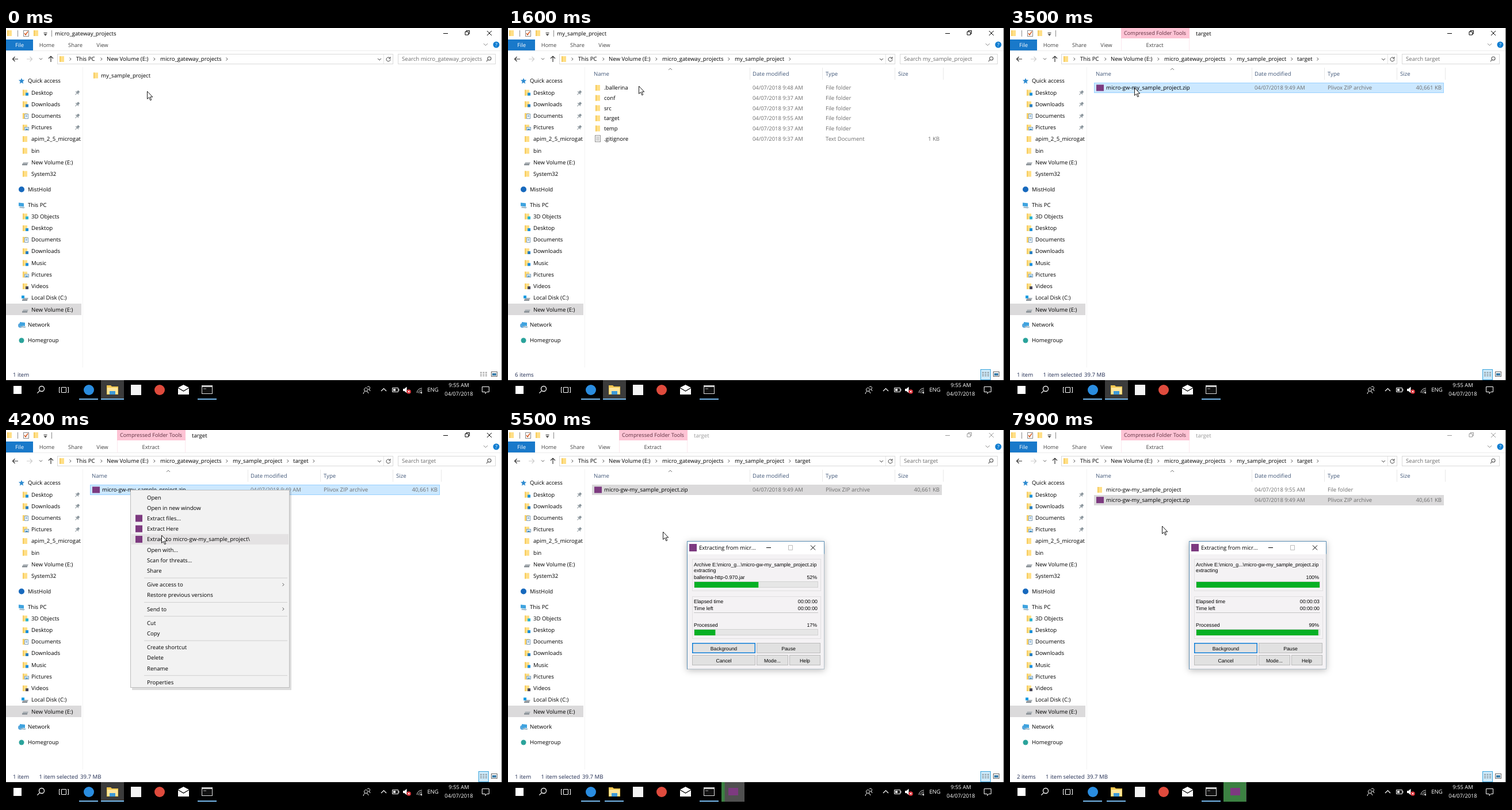
An HTML page that plays this animation: 862x650 px, repeating every 8 s.

```html
<!DOCTYPE html>
<html lang="en">
<head>
<meta charset="utf-8">
<title>Extracting a project archive</title>
<style>
html, body { margin: 0; width: 100%; height: 100%; overflow: hidden; background: #fff; }
svg { display: block; width: 100vw; height: 100vh; }
text { font-family: "Open Sans", "Noto Sans", sans-serif; text-rendering: geometricPrecision; white-space: pre; }
.dialog text { font-family: "Liberation Sans", Arial, sans-serif; }
.dialog text.title { font-family: "Open Sans", "Noto Sans", sans-serif; }
</style>
</head>
<body>
<svg id="stage" viewBox="0 0 862 650"></svg>
<script>
const LOOP = 8000, GREY = '#6d6d6d', NAVY = '#1e2a50', DIM = '#dbdadb', ARCHIVE = '#7d3a80', GREEN = '#06b025';
const stage = document.getElementById('stage');

// Drawing helpers; text is placed by its vertical centre, on a whole-pixel baseline.
const text = (x, y, s, fill = '#000', size = 9.6, anchor = 'start', cls = '') =>
  `<text class="${cls}" x="${x}" y="${Math.round(y + size * .355)}" font-size="${size}" fill="${fill}" text-anchor="${anchor}">${s}</text>`;
const rect = (x, y, w, h, fill, stroke = 'none', sw = 1) =>
  `<rect x="${x}" y="${y}" width="${w}" height="${h}" fill="${fill}" stroke="${stroke}" stroke-width="${sw}"/>`;
const frame = (x, y, w, h, fill, stroke) => rect(x + .5, y + .5, w - 1, h - 1, fill, stroke);
const line = (d, stroke = '#444', sw = 1) => `<path d="${d}" fill="none" stroke="${stroke}" stroke-width="${sw}"/>`;
const shape = (d, fill) => `<path d="${d}" fill="${fill}"/>`;
const disc = (x, y, r, fill) => `<circle cx="${x}" cy="${y}" r="${r}" fill="${fill}"/>`;
const lens = (x, y, r, c, sw) =>
  `<circle cx="${x}" cy="${y}" r="${r}" fill="none" stroke="${c}" stroke-width="${sw}"/>` +
  line(`M${x - r * .7} ${y + r * .7}l${-r} ${r}`, c, sw);
const chevron = (x, y) => line(`M${x - 1.5} ${y - 2.5}l2.5 2.5l-2.5 2.5`, '#555');
const folder = (x, y) => rect(x, y - 5, 8, 10, '#ffdf87') + rect(x, y - 5, 2, 10, '#f6cb5d');
const drive = (x, y) => shape(`M${x + 2} ${y}h9l-2 4h-9z`, '#aab0b5') + rect(x, y + 3, 9, 2, '#7e868c');

function along(t, keys) {
  const i = keys.findLastIndex(k => k[0] <= t), a = keys[i], b = keys[i + 1] || a;
  const f = b === a ? 0 : (t - a[0]) / (b[0] - a[0]);
  return [a[1] + (b[1] - a[1]) * f, a[2] + (b[2] - a[2]) * f];
}

const POINTER = [
  [0, 245, 110], [500, 233, 88], [900, 229, 90], [1500, 229, 90], [1600, 227, 101], [1700, 208, 150],
  [1800, 190, 193], [1900, 174, 160], [3400, 174, 160], [3500, 216, 104], [3700, 216, 104],
  [3800, 222, 110], [4100, 222, 110], [4200, 270, 183], [4400, 270, 183], [4500, 269, 177],
  [7700, 269, 177], [7800, 266, 171], [7900, 264, 167]];

// time, file %, total %, file name, seconds elapsed, seconds left
const PROGRESS = [
  [4800, 0, 0, '', 0, 0], [5000, 38, 4, 'ballerina-builtin-0.970.jar', 0, 0],
  [5300, 52, 14, 'ballerina-core-0.970.jar', 0, 0], [5500, 52, 17, 'ballerina-http-0.970.jar', 0, 0],
  [5600, 52, 20, 'ballerina-grpc-0.970.jar', 0, 0], [6100, 71, 36, 'commons-pool-1.5.6.jar', 1, 2],
  [6400, 34, 45, 'javax.websocket-api-1.1.jar', 1, 2], [6600, 60, 52, 'jackson-core-2.8.6.jar', 1, 2],
  [6700, 45, 56, 'netty-buffer-4.1.7.jar', 1, 2], [6800, 82, 60, 'netty-codec-4.1.7.jar', 1, 2],
  [7000, 30, 67, 'org.wso2.transport.http.jar', 2, 1], [7100, 48, 71, 'siddhi-core-4.0.7.jar', 2, 1],
  [7600, 76, 88, 'swagger-core-1.5.16.jar', 2, 1], [7800, 92, 98, 'swagger-parser-1.0.31.jar', 2, 1],
  [7900, 100, 99, '', 3, 0]];

const entry = (name, time, type = 'File folder', size = '') => ({ name, date: '04/07/2018 ' + time + ' AM', type, size });
const SAMPLE = [
  entry('.ballerina', '9:48'), entry('conf', '9:37'), entry('src', '9:37'), entry('target', '9:55'),
  entry('temp', '9:37'), entry('.gitignore', '9:37', 'Text Document', '1 KB')];
const ZIP = entry('micro-gw-my_sample_project.zip', '9:49', 'Plivox ZIP archive', '40,661 KB');
const UNPACKED = entry('micro-gw-my_sample_project', '9:55');

const MENU = ['Open', 'Open in new window', 'Extract files...', 'Extract Here',
  'Extract to micro-gw-my_sample_project\\', 'Open with...', 'Scan for threats...', 'Share', '-',
  'Give access to', 'Restore previous versions', '-', 'Send to', '-', 'Cut', 'Copy', '-',
  'Create shortcut', 'Delete', 'Rename', '-', 'Properties'];

const overlay = c => y => folder(29, y) + rect(34, y, 5, 5, c);
const sheet = y => folder(29, y) + frame(32, y - 4, 7, 9, '#fff', '#7d9cb5') + line(`M34 ${y - 1}h3m-3 2h3`, '#4a8ec2');
const picture = y => folder(29, y) + frame(32, y - 1, 8, 6, '#dceefa', '#7d9cb5') + rect(34, y + 2, 4, 2, '#4b97c9');
const plainFolder = y => folder(29, y);
const volume = y => drive(28, y);
const screen = (x, y) => shape(`M${x} ${y - 4}l9 1v6l-9-1z`, '#3fa3df') + shape(`M${x + 2} ${y + 3}l9 1l-2 2l-8-1z`, '#9db6c6');
const star = y => shape(`M27 ${y - 5}l1.5 3.3 3.6.3-2.8 2.4.9 3.7-3.2-1.9-3.2 1.9.9-3.7-2.8-2.4 3.6-.3z`, '#2e8bd0');
const SIDEBAR = [
  [92, 'Quick access', star, 1], [112.5, 'Desktop', overlay('#1f91d8')], [132.5, 'Downloads', overlay('#2b7fc0')],
  [153, 'Documents', sheet], [173, 'Pictures', picture], [193, 'apim_2_5_microgat', plainFolder],
  [213.5, 'bin', plainFolder], [233.5, 'New Volume (E:)', volume], [253.5, 'System32', plainFolder],
  [280.5, 'MistHold', y => disc(27, y, 5, '#1769bd'), 1], [307.5, 'This PC', y => screen(22, y), 1],
  [327.5, '3D Objects', overlay('#27b1d3')], [348, 'Desktop', overlay('#1f91d8')], [368, 'Documents', sheet],
  [388, 'Downloads', overlay('#2b7fc0')], [408.5, 'Music', overlay('#1c8fe0')], [428.5, 'Pictures', picture],
  [449, 'Videos', overlay('#4a4a5c')], [469, 'Local Disk (C:)', y => drive(28, y) + rect(27, y - 4, 5, 5, '#1b9de2')],
  [489.5, 'New Volume (E:)', volume],
  [516, 'Network', y => disc(25, y + 1, 4, '#58a7dd') + screen(24, y - 1), 1],
  [543, 'Homegroup', y => disc(27, y, 4.5, '#2aa39b'), 1]];

function sidebar() {
  const pin = y => `<g transform="translate(124 ${y}) rotate(45)">` + rect(-2, -4, 4, 4, '#8a959c') +
    rect(-3.5, 0, 7, 1.2, '#8a959c') + rect(-.5, 1, 1, 4, '#8a959c') + '</g>';
  return rect(0, 479, 131, 20, DIM) + rect(133, 68, 1, 522, '#f3f3f3') +
    SIDEBAR.map(([y, label, icon, root]) => icon(y) + text(root ? 38 : 44, y, label)).join('') +
    [112.5, 132.5, 153, 173].map(pin).join('');
}

function chrome({ place, active, tailChevron }) {
  const title = ['micro_gateway_projects', 'my_sample_project', 'target'][place];
  const ink = active ? '#000' : '#999';
  let out = folder(2, 9) + rect(20, 4, 1, 11, '#888') + frame(30, 4, 10, 11, '#fff', '#888') +
    line('M32 9l2 3l4-6', '#d2571e', 1.4) + folder(48, 9) + rect(65.5, 8, 6, 1, '#333') +
    shape('M65.5 10.5h6l-3 3z', '#333') + rect(79, 4, 1, 11, '#888');
  if (place === 2) out += rect(193, 0, 119, 18, '#fdc3d4') + rect(193, 18, 1, 21, '#fce8ee') + rect(311, 18, 1, 21, '#fce8ee') +
    text(252, 8.5, 'Compressed Folder Tools', '#5e3040', 9.2, 'middle') + text(251.5, 29.5, 'Extract', '#444', 9.4, 'middle');
  out += text(place === 2 ? 323 : 85, 10, title, ink) +
    line('M760 9.5h8', ink) + line('M798 6.5h5.5v5.5h-5.5zM800 6v-1.5h5.5v5.5h-2', ink) + line('M836 5l8 8m0-8l-8 8', ink) +
    rect(0, 20, 47, 19, '#1979ca') + text(23.5, 29.5, 'File', '#fff', 9.5, 'middle') +
    text(71, 29.5, 'Home', '#444', 9.4, 'middle') + text(120.5, 29.5, 'Share', '#444', 9.4, 'middle') +
    text(167.5, 29.5, 'View', '#444', 9.4, 'middle') + line('M830 27l3.5 3.5l3.5-3.5', '#888') +
    disc(852, 29, 5.5, '#0f7dd1') + text(852, 29, '?', '#fff', 8.5, 'middle') + rect(0, 39, 861, 1, '#ececec');
  out += line('M21 54h-9.5m4-4l-4 4l4 4', '#333', 1.2) + line('M36 54h9.5m-4-4l4 4l-4 4', '#ccc', 1.2) +
    line('M58 52.5l2.5 2.5l2.5-2.5', '#555') + line('M78 59v-10m-4 4l4-4l4 4', '#333', 1.2) +
    frame(89, 45, 584, 18, '#fff', '#d9d9d9') + rect(656, 46, 1, 16, '#e4e4e4') + folder(93, 54) +
    line('M646 53l3 3l3-3', '#444') + line('M667 52a3.5 3.5 0 1 0 1 2.5M668 50v3h-3', '#444') +
    frame(681, 45, 170, 18, '#fff', '#d9d9d9') + text(688, 54, 'Search ' + title, GREY) + lens(840, 53, 3, '#555', 1.1);
  const crumbs = [[122, 'This PC', 112], [175, 'New Volume (E:)', 166], [268, 'micro_gateway_projects', 258],
    [394, 'my_sample_project', 384], [499, 'target', 490]].slice(0, place + 3);
  out += crumbs.map(([x, label, c]) => chevron(c, 54) + text(x, 54, label)).join('');
  if (tailChevron) out += chevron([384, 490, 535][place], 54);
  return out;
}

function fileRow(item, y, look) {
  const [fill, stroke] = { hover: ['#e5f3ff', '#e5f3ff'], selected: ['#cce8ff', '#99d1ff'], dim: [DIM, DIM] }[look] || [];
  const icon = item === ZIP ? rect(150, y - 5.5, 13, 11, ARCHIVE)
    : item.size ? frame(151, y - 6, 10, 12, '#fff', '#8a8a8a') + line(`M153 ${y - 2.5}h6m-6 2.5h6m-6 2.5h6`, '#999')
    : folder(152, y);
  return (fill ? frame(146, Math.round(y - 9), 608, 18, fill, stroke) : '') + icon + text(167, y, item.name) +
    text(425, y, item.date, GREY, 9.4) + text(552, y, item.type, GREY) + text(750, y, item.size, GREY, 9.6, 'end');
}

function fileList(rows, looks) {
  return [420, 546, 672, 756].map(x => rect(x, 69, 1, 21, '#e8e8e8')).join('') +
    [[149, 'Name'], [425, 'Date modified'], [552, 'Type'], [678, 'Size']].map(([x, s]) => text(x, 79.5, s, '#43597a')).join('') +
    line('M279 73l3-3l3 3', '#777') +
    rows.map((r, i) => fileRow(r, 104 + i * 17.65, looks[i])).join('');
}

function statusBar(count, selected, size, detailed) {
  const x = count === 1 ? 57.5 : 62;
  return text(12, 602.5, count + (count > 1 ? ' items' : ' item'), NAVY) +
    (selected ? text(x, 602.5, '1 item selected', NAVY) : '') + (size ? text(x + 71.5, 602.5, '39.7 MB', NAVY) : '') +
    (detailed ? frame(821, 593, 18, 19, '#cdeafa', '#3aa5dc') : '') +
    line('M824 598.5h3m1.5 0h3m1.5 0h3m-12 3h3m1.5 0h3m1.5 0h3m-12 3h3m1.5 0h3m1.5 0h3', '#666') +
    frame(843, 597, 11, 9, '#fff', '#666') + rect(845, 600, 7, 4, '#3a7ca8');
}

function taskbar(extracting, percent) {
  const under = (x, w) => rect(x, 644, w, 2, '#76b9ed');
  let out = rect(0, 612, 862, 38, '#000') + rect(13, 622, 14, 14, '#fff') + lens(62, 627, 4.5, '#fff', 1.3) +
    line('M96.5 624.5h8v9h-8zM94 624.5h-1.5v9h1.5M107 624.5h1.5v9h-1.5', '#fff') + disc(144, 629, 9, '#2a8de0') + under(127, 33);
  out += extracting ? under(168, 33) : rect(165, 612, 40, 34, '#3b3b3b') + under(165, 40);
  out += shape('M175 621h7l2 2h11v14h-20z', '#f3c64f') + rect(176, 625, 18, 11, '#ffe69b') + rect(180, 631, 10, 6, '#3e9bd8') +
    rect(217, 620, 18, 18, '#f4f4f4') + disc(267, 629, 9, '#df4b3d') +
    shape('M299 625l9.5-5 9.5 5v12h-19z', '#fff') + line('M299 625.5l9.5 5.5l9.5-5.5', '#000', 1.3) +
    frame(340, 621, 19, 15, '#111', '#ddd') + rect(341, 622, 17, 2, '#ccc') + line('M343 627h5', '#aaa') + under(333, 33);
  if (extracting) out += rect(371, 612, 40, 34, '#505050') + rect(371, 612, 40 * percent / 100, 34, '#3c8142') + rect(383, 622, 17, 13, ARCHIVE);
  out += line('M624 631a3 3 0 1 1 3 0m-6 5q1-5 4.5-5q3.5 0 4.5 4M628 624a2.5 2.5 0 1 1 2 4q2 0 3 3', '#fff') +
    line('M652 631l4.5-4.5l4.5 4.5', '#fff', 1.2) + line('M671.5 625.5h10v7h-10zM683 627.5v3', '#fff') + rect(673, 627, 4, 4, '#fff') +
    shape('M690 627h2.5l4-3.5v11l-4-3.5h-2.5z', '#fff') + disc(700, 632, 3.8, '#e0343c') + line('M698.5 630.5l3 3m0-3l-3 3', '#fff') +
    line('M714 634a9 9 0 0 1 9-8M716.5 634.5a6.5 6.5 0 0 1 6.5-5.5M719 635a4 4 0 0 1 4-3.5', '#ddd') + disc(722, 634, 1.2, '#fff') +
    text(742, 629, 'ENG', '#fff', 9.6, 'middle') + text(787, 621, '9:55 AM', '#fff', 9.4, 'middle') +
    text(787, 636, '04/07/2018', '#fff', 9.3, 'middle') + line('M827.5 623.5h12v9h-4l-2.5 3v-3h-5.5z', '#fff');
  return out;
}

const extractItem = y => rect(225, y - 6, 12, 12, ARCHIVE);

function menu(pointerY) {
  let y = 108, out = rect(219, 107, 277, 345, '#00000022') + frame(216, 104, 277, 344, '#f2f2f2', '#bdbdbd');
  for (const label of MENU) {
    if (label === '-') { out += rect(240, y + 3, 249, 1, '#d0d0d0'); y += 6; continue; }
    const mid = y + 9.1;
    if (pointerY >= y && pointerY < y + 18.2) out += rect(218, y, 273, 18.2, '#e4e2e3');
    if (label.startsWith('Extract')) out += extractItem(mid);
    out += text(245, mid, label);
    if (/to$/.test(label)) out += chevron(482, mid);
    y += 18.2;
  }
  return out;
}

function dialog([, file, total, name, elapsed, left]) {
  const right = (y, s, x = 538) => text(x, y, s, '#000', 8.8, 'end');
  const label = (y, s) => text(323, y, s, '#000', 8.85);
  const bar = (y, p) => frame(323, y, 216, 11, '#e6e6e6', '#d2d2d2') + rect(324, y + 1, 214 * p / 100, 10, GREEN);
  const group = (y, h) => frame(320, y, 224, h, 'none', '#e0dfe0');
  const button = (x, y, w, s, focus) => frame(x, y, w, 18, '#e1e1e1', focus ? '#0078d7' : '#bbb') +
    (focus ? rect(x + 1, y + 1, w - 2, 16, 'none', '#0078d7', .8) : '') + text(x + w / 2, y + 9.5, s, '#000', 8.7, 'middle');
  const clock = s => '00:00:0' + s;
  return '<g class="dialog"><g style="filter:drop-shadow(0 2px 6px #0004)">' + frame(311, 193, 239, 223, '#f4f2f4', '#b4c0c9') + '</g>' +
    rect(312, 194, 237, 22, '#fff') + line('M311.5 416v-222.5h238v22', '#5b8fb5') + rect(315, 198, 13, 13, ARCHIVE) +
    text(332, 204.5, 'Extracting from micr...', '#000', 9.6, 'start', 'title') +
    line('M449 204.5h8', '#000') + line('M487.5 200.5h7v8h-7z', '#bbb') + line('M526 200.5l8 8m0-8l-8 8', '#000') +
    group(224, 56) + label(233.5, 'Archive E:\\micro_g...\\micro-gw-my_sample_project.zip') + label(244, 'extracting') +
    label(256, name) + right(256, file + '%', 537) + bar(263, file) + group(289, 74) +
    label(297.5, 'Elapsed time') + right(297.5, clock(elapsed)) + label(309.5, 'Time left') + right(309.5, clock(left)) +
    rect(323, 317, 216, 1, '#c4c4c4') + label(339, 'Processed') + right(339, total + '%', 537) + bar(346, total) +
    button(320, 370, 110, 'Background', true) + button(432, 370, 111, 'Pause') + button(320, 391, 110, 'Cancel') +
    button(432, 391, 55, 'Mode...') + button(489, 391, 54, 'Help') + '</g>';
}

function pointer(x, y, busy) {
  return `<path transform="translate(${x} ${y})" d="M.5 0v13.3l3-2.8 2.3 5.2 2-.9-2.3-4.9h4.3z" fill="#fff" stroke="#000" stroke-width=".9"/>` +
    (busy ? `<circle cx="${x + 11.5}" cy="${y}" r="5" fill="#d9effc" stroke="#1683d3" stroke-width="3"/>` : '');
}

function content(t, place, py) {
  if (place === 0) {
    const selected = t >= 900, hover = py <= 91;
    return (selected ? frame(146, 74, 159, 17, '#cce8ff', '#99d1ff') : hover ? rect(146, 74, 159, 17, '#e5f3ff') : '') +
      folder(152, 82.5) + text(165, 82.5, 'my_sample_project') + statusBar(1, selected);
  }
  if (place === 1) {
    if (t < 1200) return '';
    const looks = [];
    if (t >= 1700) looks[Math.floor((py - 95) / 17.65)] = t >= 2200 ? 'selected' : 'hover';
    return fileList(SAMPLE, looks) + statusBar(6, t >= 2200, false, true);
  }
  if (t < 3200) return statusBar(1, false, false, true);
  const rows = t < 5800 ? [ZIP] : t < 6400 ? [ZIP, UNPACKED] : [UNPACKED, ZIP];
  const look = t < 3500 ? '' : t < 4800 ? 'selected' : 'dim';
  return fileList(rows, rows.map(r => r === ZIP ? look : '')) + statusBar(rows.length, t >= 3500, t >= 3500, true);
}

function scene(t) {
  const place = t < 1100 ? 0 : t < 3100 ? 1 : 2;
  const [px, py] = along(t, POINTER);
  const extracting = t >= 4800;
  const stepIndex = PROGRESS.findLastIndex(p => p[0] <= t);
  // The taskbar button trails the dialog by one step.
  const trailing = PROGRESS[Math.max(0, stepIndex - 1)][2];
  const tailChevron = !(t >= 1100 && t < 1400) && !(t >= 4800 && t < 6100);
  let out = rect(0, 0, 862, 650, '#fff') + chrome({ place, active: !extracting, tailChevron }) +
    sidebar() + content(t, place, py) + rect(861, 0, 1, 612, '#555') + taskbar(extracting, trailing);
  if (t >= 3700 && t < 4700) out += `<g opacity="${t < 3800 ? .5 : 1}">${menu(t < 3800 ? 0 : py)}</g>`;
  if (t >= 4700 && t < 5000) out += `<g opacity="${t < 4800 ? 1 : .3}">` + rect(218, 163, 273, 18.5, '#e4e2e3') +
    extractItem(172.3) + text(245, 172.3, 'Extract Here', '#333') + '</g>';
  if (extracting) out += dialog(PROGRESS[stepIndex]);
  return out + pointer(px, py, t >= 4700 && t < 5000);
}

let shown = -1;
function tick() {
  const t = Math.floor(performance.now() % LOOP / 100) * 100;
  if (t !== shown) stage.innerHTML = scene(shown = t);
  requestAnimationFrame(tick);
}
tick();
</script>
</body>
</html>
```
